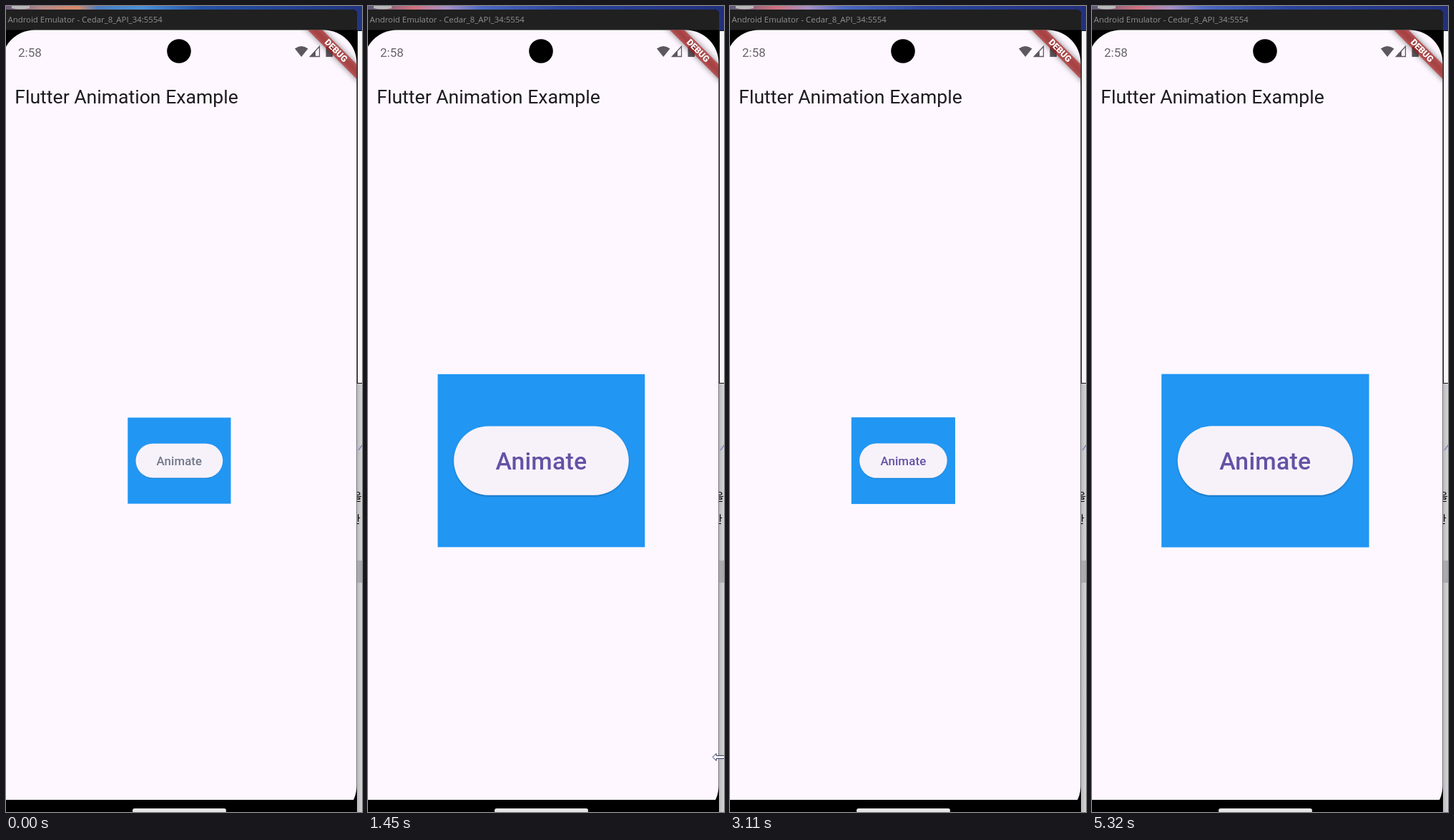
These frames come from a looping animation (498 by 1125 pixels, 5.39 s). An HTML page:

```html
<!DOCTYPE html>
<html>
<head>
<meta charset="utf-8">
<style>
  html, body { margin: 0; width: 100%; height: 100%; overflow: hidden; background: #000; }
  svg { display: block; }
  text { font-family: Roboto, sans-serif; }
  .bar { font-family: 'Open Sans', 'Noto Sans', sans-serif; }
  .page { font-family: 'Noto Sans CJK KR', 'Noto Sans CJK', sans-serif; }
</style>
</head>
<body>
<svg width="498" height="1125" viewBox="0 0 498 1125">
  <defs>
    <linearGradient id="warm">
      <stop offset="0" stop-color="#6a5a78"/><stop offset=".1" stop-color="#b58a88"/>
      <stop offset=".2" stop-color="#d88a68"/><stop offset=".26" stop-color="#4a7cc0"/>
      <stop offset=".38" stop-color="#4a90d8"/><stop offset=".55" stop-color="#2451a6"/>
      <stop offset="1" stop-color="#22357f"/>
    </linearGradient>
    <linearGradient id="cool">
      <stop offset="0" stop-color="#5d5a78"/><stop offset=".13" stop-color="#d0707c"/>
      <stop offset=".22" stop-color="#a88fc8"/><stop offset=".32" stop-color="#4a68c0"/>
      <stop offset=".55" stop-color="#2a459c"/><stop offset="1" stop-color="#22307c"/>
    </linearGradient>
    <linearGradient id="edge">
      <stop offset="0" stop-color="#b4b3b6"/><stop offset="1" stop-color="#d6d5d8"/>
    </linearGradient>
    <clipPath id="screen"><rect x="-6" y="33.500" width="496.500" height="1101" rx="46"/></clipPath>
    <filter id="soft" x="-20%" y="-20%" width="140%" height="150%">
      <feDropShadow dx="0" dy=".7" stdDeviation=".6" flood-opacity=".28"/>
    </filter>
    <filter id="blur" x="-20%" y="-150%" width="140%" height="400%">
      <feGaussianBlur stdDeviation="4"/>
    </filter>
  </defs>

  <!-- desktop behind the emulator -->
  <rect id="sky" width="498" height="36" fill="url(#warm)"/>
  <path d="M8 0H33V3Q20 6 8 3Z" fill="#b9b9bb"/>
  <rect x="490" y="34" width="8" height="1091" fill="url(#edge)"/>
  <rect x="491.500" y="34.500" width="9" height="492" fill="#f9f5f9" stroke="#111"/>
  <rect x="490" y="774" width="8" height="31" fill="#aaa9ad"/>
  <path d="M493 620L499 612" stroke="#7d88c8" stroke-width="1.5"/>
  <g font-size="15" font-weight="500">
    <text class="page" x="484" y="690">을</text>
    <text class="page" x="482" y="722">한</text>
  </g>

  <!-- emulator window -->
  <path d="M0 5H484Q491 5 491 12V1125H0Z"/>
  <path d="M0 5H484Q491 5 491 12V33.500H0Z" fill="#202020"/>
  <text class="bar" x="2.500" y="23" font-size="11.4" fill="#929292">Android Emulator - Cedar_8_API_34:5554</text>
  <g clip-path="url(#screen)">
    <rect y="33" width="491" height="1075" fill="#fef7ff"/>
    <circle cx="242" cy="63" r="16.8"/>
    <text x="17" y="70.500" font-size="17" fill="#69646b">2:58</text>
    <g fill="#5d585f">
      <path d="M404 59.500Q413 52.500 422.500 59.500L413.200 71Z"/>
      <path d="M425.500 70.500L438.500 56.500V70.500Z" fill="none" stroke="#5d585f" stroke-width="1.3"/>
      <path d="M425 71L433 62.500V71Z"/>
      <path d="M447.500 57H450V55H454V57H457V71H447.500Z"/>
    </g>
    <text x="12.300" y="136" font-size="26.6" fill="#1d1b20">Flutter Animation Example</text>
    <g transform="translate(490.500 33.500) rotate(45)">
      <rect x="-60" y="33.800" width="120" height="14.500" fill-opacity=".5" filter="url(#blur)"/>
      <rect x="-60" y="33.800" width="120" height="14.500" fill="#b71c1c" fill-opacity=".63"/>
      <text y="44.800" font-size="12.3" font-weight="900" fill="#fff" text-anchor="middle">DEBUG</text>
    </g>
    <g id="box">
      <rect x="-72.500" y="-60.400" width="145" height="120.800" fill="#2196f3"/>
      <rect x="-61.200" y="-24.100" width="122.400" height="48.200" rx="24.1" fill="#f7f2fa" filter="url(#soft)"/>
      <text id="label" y="6.200" font-size="16.9" font-weight="500" letter-spacing=".12" text-anchor="middle">Animate</text>
    </g>
  </g>
  <rect x="177" y="1120" width="131" height="6" rx="3" fill="#e6e6e6"/>
  <g id="cursor" fill="#fff" stroke="#262c58">
    <path id="arrow" d="M.5 .5V16.500L4.200 13L6.700 18.500L9 17.500L6.500 12H11Z"/>
    <path id="resize" d="M0 0L5 -5V-2H18V-5L23 0L18 5V2H5V5Z"/>
  </g>
</svg>
<script>
const LOOP = 5390;
const MIDS = [634, 2616, 4655];   // midpoints of grow, shrink, grow
const PATH = [[70, 498, 1078], [420, 348, 785], [1150, 348, 785],
              [1310, 440, 945], [1450, 482, 1048], [1600, 506, 1100]];
const get = id => document.getElementById(id);
const [sky, box, label, cursor, arrow, resize] =
  ['sky', 'box', 'label', 'cursor', 'arrow', 'resize'].map(get);
const show = (el, on) => el.setAttribute('visibility', on ? 'visible' : 'hidden');

// elastic in-out, u from -1 to 1
function elastic(u) {
  const wave = 0.5 * 2 ** (-10 * Math.abs(u)) * Math.cos(5 * Math.PI * u);
  return u < 0 ? wave : 1 - wave;
}

function scaleAt(t) {
  const i = t < 1625 ? 0 : t < 3635 ? 1 : 2;
  const u = (t - MIDS[i]) / 1000;
  return 1 + elastic(i === 1 ? -u : u);
}

function pointAt(t) {
  const i = PATH.findIndex(p => p[0] > t);
  if (i < 1) return null;
  const [a, b] = [PATH[i - 1], PATH[i]];
  const k = (t - a[0]) / (b[0] - a[0]);
  return [a[1] + (b[1] - a[1]) * k, a[2] + (b[2] - a[2]) * k];
}

function draw(t) {
  box.setAttribute('transform', `translate(242.4 634.6) scale(${scaleAt(t)})`);
  label.setAttribute('fill', t < 70 ? '#70788a' : '#6551a5');
  sky.setAttribute('fill', t < 1110 ? 'url(#warm)' : 'url(#cool)');
  const p = pointAt(t);
  const sizing = t > 1400;
  show(arrow, p && !sizing);
  show(resize, p && sizing);
  if (p) cursor.setAttribute('transform', `translate(${p})`);
}

const start = performance.now();
function tick() {
  draw((performance.now() - start) % LOOP);
  requestAnimationFrame(tick);
}
tick();
</script>
</body>
</html>
```
